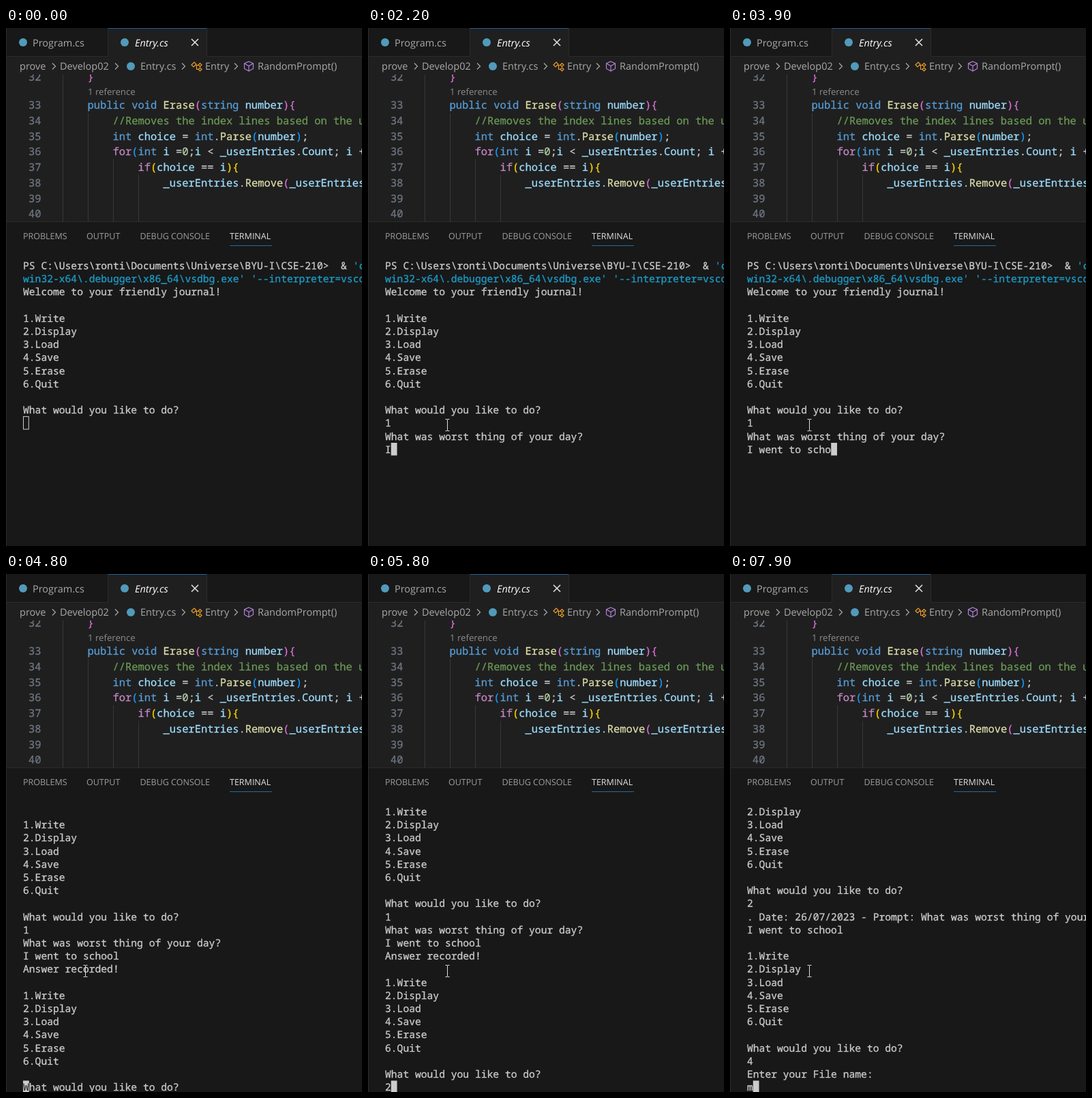
An HTML page for the animation above (8 s loop, 522 by 758 pixels).

```html
<!DOCTYPE html>
<html lang="en">
<head>
<meta charset="utf-8">
<title>Journal program in an editor terminal</title>
<style>
  html, body { margin: 0; width: 100%; height: 100%; overflow: hidden; background: #181818; }
  svg { display: block; width: 522px; height: 758px; }
  text { white-space: pre; text-rendering: geometricPrecision; }
  .ui { font: 14.5px "Open Sans", "Noto Sans", sans-serif; fill: #a9a9a9; }
  .panel { font-size: 12.5px; fill: #9d9d9d; }
  .code { font: 15.42px "Noto Sans Mono", "DejaVu Sans Mono", monospace; }
  .term { font: 14.667px "Noto Sans Mono", "DejaVu Sans Mono", monospace; }
  /* A hairline outline gives the monospaced text its slightly heavier weight. */
  .code, .term { fill: #cccccc; stroke: #cccccc; }
  .code text, .term text { stroke-width: .3; }
  .num { fill: #6e7681; stroke: #6e7681; }
  .kw { fill: #569cd6; stroke: #569cd6; }
  .flow { fill: #c586c0; stroke: #c586c0; }
  .fn { fill: #dcdcaa; stroke: #dcdcaa; }
  .var { fill: #9cdcfe; stroke: #9cdcfe; }
  .lit { fill: #b5cea8; stroke: #b5cea8; }
  .note { fill: #6a9955; stroke: #6a9955; }
  .b1 { fill: #ffd700; stroke: #ffd700; }
  .b2 { fill: #da70d6; stroke: #da70d6; }
  .b3 { fill: #179fff; stroke: #179fff; }
  .arg { fill: #1b9dc9; stroke: #1b9dc9; }
  .line { fill: none; stroke: #a9a9a9; stroke-width: 1.2; }
  #covered { fill: #181818; stroke: none; }
</style>
</head>
<body>
<svg viewBox="0 0 522 758">
  <defs>
    <clipPath id="codeClip"><rect y="68" width="522" height="215"/></clipPath>
    <clipPath id="termClip"><rect y="338" width="522" height="420"/></clipPath>
  </defs>

  <rect width="522" height="758" fill="#181818"/>
  <rect y="41" width="522" height="242" fill="#1f1f1f"/>
  <path d="M0 41.5H150M294 41.5H522M149.5 0V41M294.5 0V41M0 283.5H522M.5 0V758" stroke="#2b2b2b"/>
  <rect x="150" width="144" height="42" fill="#1f1f1f"/>
  <rect x="150" width="144" height="1" fill="#1c6199"/>

  <g fill="#519aba">
    <circle cx="25" cy="21" r="6"/>
    <circle cx="174" cy="21" r="6"/>
    <circle cx="183" cy="56" r="6"/>
  </g>
  <g class="ui">
    <text x="39" y="27">Program.cs</text>
    <text x="189" y="27" font-style="italic" style="fill:#fff">Entry.cs</text>
    <text x="20" y="61">prove</text>
    <text x="79" y="61">Develop02</text>
    <text x="197" y="61">Entry.cs</text>
    <text x="292" y="61">Entry</text>
    <text x="369" y="61">RandomPrompt()</text>
  </g>
  <path class="line" d="M272 16l10 10m0-10l-10 10" style="stroke:#e4e4e4;stroke-width:1.5"/>
  <path class="line" d="M68 51.5l4.5 4.5-4.5 4.5M160 51.5l4.5 4.5-4.5 4.5M258 51.5l4.5 4.5-4.5 4.5M335 51.5l4.5 4.5-4.5 4.5"/>
  <path class="line" style="stroke:#ee9d28" d="M272 54l4-4 3 3-4 4zM278 54.5h4M279.5 54.5v6h3M282 54l2.5-2.5 2.5 2.5-2.5 2.5zM282 60.5l2.5-2.5 2.5 2.5-2.5 2.5z"/>
  <path class="line" style="stroke:#b180d7" d="M356 49l6.5 3v7.5l-6.5 3.5-6.5-3.5v-7.5zM349.5 52l6.5 3.5 6.5-3.5M356 55.5v7.5"/>

  <g clip-path="url(#codeClip)">
    <path d="M83.5 68V283M120.5 124V283M157.5 192V283M194.5 215V283" stroke="#383838"/>
    <text class="ui" x="120" y="97.5" style="font-size:13.2px;fill:#8c8c8c">1 reference</text>
    <g id="code" class="code"></g>
  </g>

  <g class="ui">
    <text class="panel" x="25" y="308.5">PROBLEMS</text>
    <text class="panel" x="118" y="308.5">OUTPUT</text>
    <text class="panel" x="196.5" y="308.5">DEBUG CONSOLE</text>
    <text class="panel" x="328" y="308.5" style="fill:#e0e0e0">TERMINAL</text>
  </g>
  <rect x="328" y="318" width="62" height="1" fill="#1f6aa5"/>

  <g clip-path="url(#termClip)">
    <g id="term" class="term">
      <rect id="cursor" height="18.5"/>
      <text id="covered"></text>
    </g>
  </g>
  <path id="pointer" d="M-3-8.5h2.5l.5.5.5-.5h2.5M0-8V8M-3 8.5h2.5l.5-.5.5.5h2.5" fill="none" stroke="#ddd"/>
</svg>

<script>
const LOOP = 8000;
const $ = id => document.getElementById(id);

function setAttributes(el, attributes) {
  for (const [name, value] of Object.entries(attributes)) el.setAttribute(name, value);
}

function addText(parent, x, y, markup) {
  const el = document.createElementNS('http://www.w3.org/2000/svg', 'text');
  setAttributes(el, { x, y });
  el.innerHTML = markup;
  return parent.insertBefore(el, parent.querySelector('#covered'));
}

// Editor: [indent, "class|text" tokens separated by "~"], one entry per line from 32 on.
const source = [
  [0, 'b2|}'],
  [0, 'kw|public void ~fn|Erase~b2|(~kw|string ~var|number~b2|){'],
  [1, 'note|//Removes the index lines based on the user choice'],
  [1, 'kw|int ~var|choice ~|= ~kw|int~|.~fn|Parse~b3|(~var|number~b3|)~|;'],
  [1, 'flow|for~b3|(~kw|int ~var|i ~|=~lit|0~|;~var|i ~|&lt; ~var|_userEntries~|.~var|Count~|; ~var|i ~|++'],
  [2, 'flow|if~b1|(~var|choice ~|== ~var|i~b1|){'],
  [3, 'var|_userEntries~|.~fn|Remove~b2|(~var|_userEntries'],
  [0, ''],
  [0, '']
];
source.forEach(([indent, tokens], i) => {
  const y = i ? 118 + (i - 1) * 22.75 : 76.5;
  const spans = tokens.split('~').map(token => {
    const [kind, text = ''] = token.split('|');
    return `<tspan class="${kind}">${text}</tspan>`;
  });
  addText($('code'), 33, y, `<tspan class="num">${32 + i}</tspan>`);
  addText($('code'), 119.5 + indent * 37, y, spans.join(''));
});

// Terminal
const ROW = 19.2, COL = 8.8, LEFT = 25, TOP = 338.2, BASE = 14.8, LAST_ROW = 21;
const rowY = row => TOP + row * ROW;
const menu = ['', '1.Write', '2.Display', '3.Load', '4.Save', '5.Erase', '6.Quit', '',
  'What would you like to do?'];
const question = 'What was worst thing of your day?';
const answer = 'I went to school';
const log = [
  'PS C:\\Users\\ronti\\Documents\\Universe\\BYU-I\\CSE-210>  &amp; <tspan class="arg">\'c:</tspan>',
  '<tspan class="arg">win32-x64\\.debugger\\x86_64\\vsdbg.exe\' \'--interpreter=vscode</tspan>',
  'Welcome to your friendly journal!',
  ...menu, '1', question, answer, 'Answer recorded!',
  ...menu, '2', '. Date: 26/07/2023 - Prompt: ' + question, answer,
  ...menu, '4', 'Enter your File name:', 'm'
];
const rows = log.map((line, i) => addText($('term'), LEFT, rowY(i) + BASE, line));
const FIRST_INPUT = 12;

// [start time, cursor row, cursor column, visible characters if different]
const steps = [
  [0, 12, 0], [600, 12, 1], [800, 14, 0],
  ...[...answer].map((_, i) => [2200 + i * 128, 14, i + 1]),
  [4800, 24, 0, 26], [4900, 25, 0], [5700, 25, 1],
  [6100, 37, 0], [7200, 37, 1], [7400, 39, 0], [7800, 39, 1]
];

function drawTerminal(t) {
  const [, row, col, shown = col] = steps.filter(step => step[0] <= t).pop();
  for (let i = FIRST_INPUT; i < log.length; i++) {
    rows[i].textContent = i < row ? log[i] : i === row ? log[i].slice(0, shown) : '';
  }
  const x = LEFT + col * COL, y = rowY(row);
  const focused = t >= 500;
  setAttributes($('cursor'), focused
    ? { x, y, width: COL, fill: '#cccccc', stroke: 'none' }
    : { x: x + .5, y, width: COL - 1, fill: 'none', stroke: '#cccccc' });
  setAttributes($('covered'), { x, y: y + BASE });
  $('covered').textContent = shown > col ? log[row][col] : '';
  const scroll = Math.max(0, row - LAST_ROW) * ROW;
  $('term').setAttribute('transform', `translate(0 ${-scroll})`);
}

function drawPointer(t) {
  const progress = Math.min(1, Math.max(0, (t - 100) / 400));
  const rest = (1 - progress) ** 2;
  setAttributes($('pointer'), {
    visibility: t < 100 ? 'hidden' : 'visible',
    transform: `translate(${116.5 + 383 * rest} ${581 - 573 * rest})`
  });
}

function frame() {
  const t = performance.now() % LOOP;
  drawTerminal(t);
  drawPointer(t);
  requestAnimationFrame(frame);
}
frame();
</script>
</body>
</html>
```
